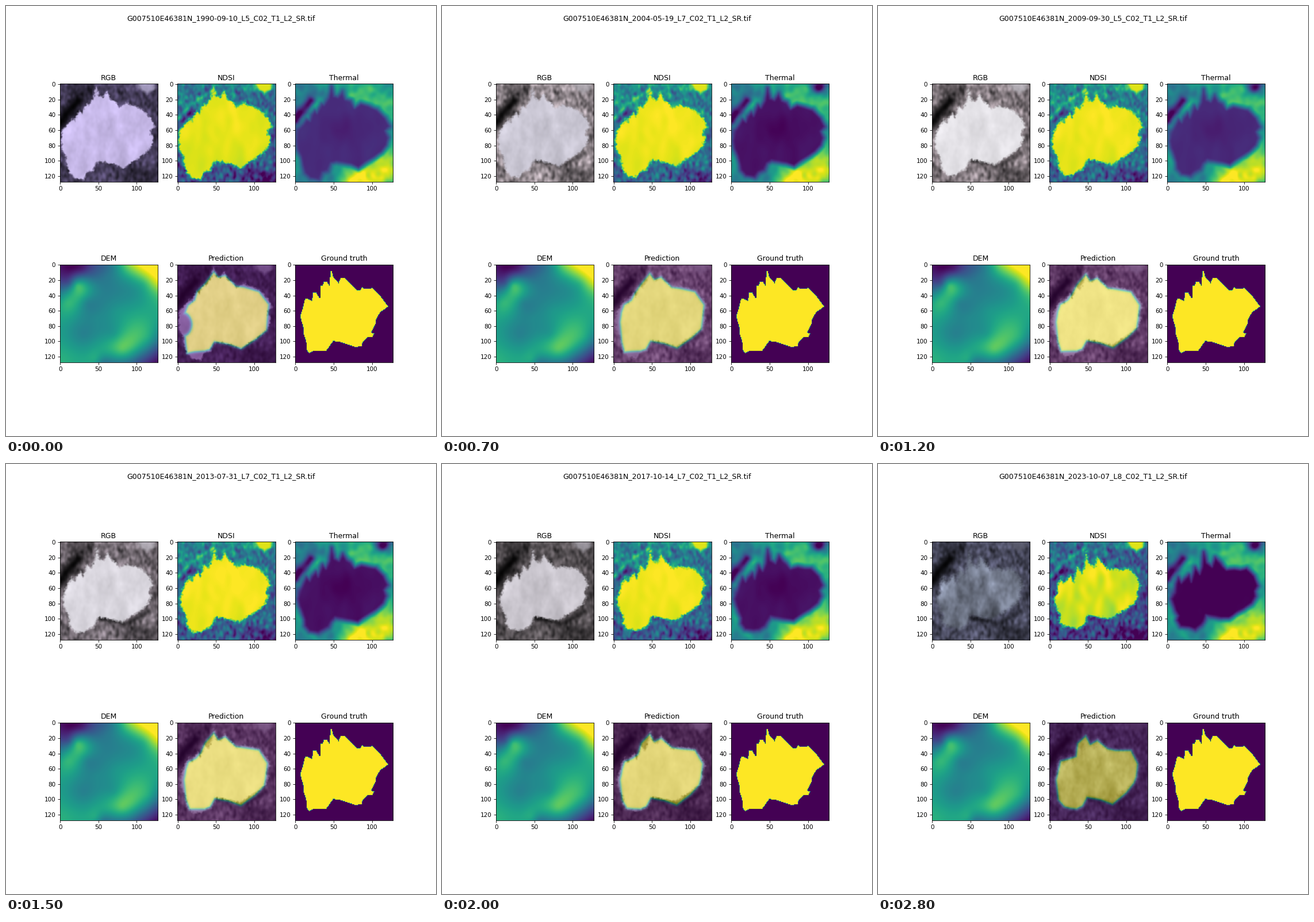
Animation of 748 by 748 pixels, one loop 2.9 s. Source, as a matplotlib script:

```python
import numpy as np
import matplotlib.pyplot as plt
from matplotlib.animation import FuncAnimation
from matplotlib.path import Path

N = 128
rng = np.random.default_rng(7)
Y, X = np.mgrid[0:N, 0:N].astype(float)
GRID = np.column_stack([X.ravel(), Y.ravel()])

SCENES = """1990-09-10_L5 1994-08-20_L5 1995-09-08_L5 1997-08-28_L5 1999-09-11_L7
2000-08-21_L7 2003-08-06_L5 2004-05-19_L7 2004-09-08_L5 2005-08-26_L5
2006-07-28_L7 2008-09-03_L7 2009-09-30_L5 2011-09-20_L5 2012-08-20_L7
2013-07-31_L7 2014-09-05_L8 2015-08-30_L8 2016-09-10_L8 2017-08-19_L8
2017-10-14_L7 2018-09-24_L8 2019-09-03_L8 2021-09-08_L8 2022-07-16_L8
2022-08-25_L8 2022-09-18_L8 2023-08-20_L8 2023-10-07_L8""".split()

# Values of each quantity at the key scenes, interpolated in between
KEYS = [0, 7, 12, 15, 20, 24, 28]
MELT = [0, .25, .4, .5, .7, .95, 1]
ICE = [(200, 186, 234), (203, 200, 213), (229, 227, 232), (219, 216, 224),
       (203, 199, 207), (160, 160, 170), (112, 119, 136)]
ROCK = [(68, 60, 88), (139, 130, 135), (126, 117, 122), (110, 102, 109),
        (82, 77, 80), (79, 77, 86), (70, 71, 90)]
SNOW = [(205, 196, 236), (186, 182, 190), (203, 200, 208), (206, 202, 212),
        (184, 180, 190), (145, 145, 156), (98, 99, 116)]
PATCHY = [.035, .03, .02, .025, .03, .06, .13]
SHADE = [.15, .45, .45, .55, .55, .55, .45]
EDGE = [3.5, 4.5, 4.5, 4.5, 4.5, 5.5, 8]
NDSI_ROCK = [.34, .42, .41, .38, .38, .36, .28]
NDSI_ICE = [.95, .965, .965, .975, .97, .945, .925]
COLD = [.125, .05, .12, .045, .045, .015, 0]
SPOT = [0, 1, .9, 1, 1, 1, 1]

ICE_OLD = np.array([
    (1, 74), (3, 59), (10, 52), (14, 46), (19, 48), (21, 40), (25, 35), (28, 38),
    (34, 26), (37, 27), (43, 18), (47, 3), (50, 16), (55, 17), (61, 10), (65, 20),
    (72, 22), (77, 31), (85, 25), (95, 28), (106, 33), (117, 44), (123, 55),
    (117, 61), (121, 70), (119, 80), (112, 89), (101, 97), (91, 103), (82, 110),
    (72, 105), (53, 101), (46, 103), (42, 113), (35, 115), (31, 125), (19, 123),
    (12, 116), (9, 106), (7, 95), (2, 85)], float)
ICE_NEW = np.array([
    (5, 74), (10, 66), (11, 55), (14, 46), (18, 53), (22, 49), (28, 43), (31, 52),
    (36, 33), (42, 42), (45, 32), (47, 13), (51, 27), (58, 32), (62, 20), (69, 27),
    (72, 31), (77, 36), (87, 35), (95, 36), (103, 34), (113, 44), (118, 57),
    (114, 64), (115, 71), (110, 80), (99, 88), (91, 92), (84, 97), (80, 99),
    (70, 99), (50, 95), (47, 104), (44, 108), (36, 114), (28, 111), (17, 110),
    (12, 102), (14, 96), (10, 89), (8, 82)], float)
PRED_OLD = np.array([
    (8, 75), (9, 64), (13, 53), (22, 46), (25, 35), (35, 25), (47, 9), (53, 16),
    (62, 14), (76, 28), (86, 29), (106, 35), (119, 52), (117, 71), (116, 86),
    (103, 97), (83, 110), (65, 104), (48, 101), (42, 111), (35, 113), (22, 114),
    (12, 116), (10, 101)], float)
PRED_NEW = np.array([
    (8, 75), (12, 58), (14, 50), (25, 47), (34, 44), (36, 27), (47, 17), (53, 28),
    (62, 23), (76, 34), (86, 36), (106, 36), (115, 54), (113, 71), (110, 79),
    (100, 92), (82, 107), (66, 101), (49, 98), (43, 109), (35, 113), (26, 112),
    (19, 110), (11, 101)], float)
TRUTH = [
    (46, 8), (47.5, 8), (48.4, 15), (53, 21), (56, 24), (59.5, 17), (63.5, 17),
    (72, 25.5), (80.7, 33.8), (84.5, 33), (87, 29.5), (89.7, 32), (100, 30.8),
    (110, 40.5), (120.6, 54.8), (110, 62.3), (105, 71), (104, 77), (98.7, 88.6),
    (102.5, 90), (100, 94.6), (93, 95), (87.5, 101), (86, 106.6), (77.7, 107.4),
    (65, 103), (57.4, 100.6), (49, 99.8), (42.4, 109), (40, 112), (27.4, 112.6),
    (22, 113), (17.6, 115.6), (14.6, 111), (14, 101), (11, 91.6), (10, 81),
    (7.1, 71), (6.4, 66), (8.6, 60), (11, 51), (12.4, 44.3), (15, 44),
    (21.4, 47.5), (23, 37), (26.7, 36), (31, 43.5), (32.7, 43.5), (32.7, 27),
    (35.7, 27), (37, 22.5), (41, 22.5), (44.5, 28), (45.2, 12)]

DEM_POINTS = [
    (0, 0, .04), (13, 8, .04), (0, 22, .2), (12, 25, .3), (0, 45, .54),
    (22, 27, .66), (9, 50, .66), (0, 62, .6), (28, 8, .12), (42, 0, .2),
    (42, 16, .34), (60, 14, .39), (64, 0, .38), (76, 4, .55), (87, 3, .76),
    (105, 2, 1), (117, 12, .98), (123, 25, .88), (127, 42, .7), (108, 26, .63),
    (90, 20, .56), (60, 36, .43), (35, 50, .45), (30, 92, .44), (48, 70, .47),
    (8, 82, .53), (4, 106, .58), (5, 124, .63), (35, 115, .57), (45, 123, .6),
    (62, 112, .61), (80, 110, .74), (94, 105, .71), (114, 95, .61), (127, 90, .48),
    (126, 112, .22), (122, 126, .08), (103, 120, .36), (84, 127, .4), (56, 127, .4),
    (72, 60, .52), (100, 60, .58), (120, 62, .6), (70, 90, .54)]
HEAT_POINTS = [
    (0, 0, .45), (18, 4, .45), (10, 18, .4), (32, 16, .5), (50, 0, .55),
    (66, 9, .56), (82, 16, .72), (96, 4, .62), (112, 4, .6), (104, 22, .7),
    (122, 20, .7), (127, 4, .48), (127, 42, .62), (127, 62, .54), (125, 80, .64),
    (118, 97, .85), (100, 108, .86), (85, 116, .95), (74, 122, .96), (62, 127, .78),
    (104, 124, .95), (120, 116, .92), (127, 127, .66), (68, 110, .68), (52, 112, .5),
    (50, 127, .5), (38, 121, .42), (24, 122, .52), (10, 116, .5), (0, 127, .4),
    (0, 104, .55), (0, 82, .5), (0, 66, .4), (20, 34, .5), (60, 60, .5)]


def at(i, values):
    cols = np.array(values, float).reshape(len(KEYS), -1).T
    out = np.array([np.interp(i, KEYS, c) for c in cols])
    return out if len(out) > 1 else out[0]


def noise(sx, sy):
    f = np.fft.fftfreq(N)
    kernel = np.exp(-2 * np.pi**2 * ((sx * f[None])**2 + (sy * f[:, None])**2))
    out = np.fft.ifft2(np.fft.fft2(rng.normal(size=(N, N))) * kernel).real
    return out / out.std()


def smooth(t):
    t = np.clip(t, 0, 1)
    return t * t * (3 - 2 * t)


def line_dist(points, closed=False):
    p = np.array(points, float)
    a, b = (p, np.roll(p, -1, 0)) if closed else (p[:-1], p[1:])
    best = np.full(N * N, 1e9)
    for s, e in zip(a, b):
        v = e - s
        t = np.clip((GRID - s) @ v / (v @ v), 0, 1)
        best = np.minimum(best, np.hypot(*(GRID - s - t[:, None] * v).T))
    return best.reshape(N, N)


def inside(points):
    return Path(points).contains_points(GRID).reshape(N, N)


def depth(points):
    """Signed distance to the outline, positive inside."""
    return np.where(inside(points), 1, -1) * line_dist(points, True)


def streak(points, width):
    return np.exp(-(line_dist(points) / width)**2 / 2)


def blob(x, y, rx, ry):
    return np.exp(-((X - x) / rx)**2 / 2 - ((Y - y) / ry)**2 / 2)


def surface(points):
    """Thin-plate spline through (x, y, value) points."""
    p = np.array(points, float)
    xy, n = p[:, :2] / N, len(p)

    def basis(q):
        r2 = ((q[:, None] - xy[None])**2).sum(2)
        return r2 * np.log(r2 + 1e-12)

    def plane(q):
        return np.column_stack([np.ones(len(q)), q])

    m = np.zeros((n + 3, n + 3))
    m[:n, :n] = basis(xy)
    m[:n, n:] = plane(xy)
    m[n:, :n] = plane(xy).T
    w = np.linalg.solve(m, np.r_[p[:, 2], 0, 0, 0])
    q = GRID / N
    return np.clip(basis(q) @ w[:n] + plane(q) @ w[n:], 0, 1).reshape(N, N)


fine, grain = noise(.8, .8), noise(1.3, 2)
rough, broad, folds = noise(3, 3), noise(8, 8), noise(4, 7)

cliff = streak([(0, 50), (12, 34), (24, 22)], 4.5)
gully = streak([(0, 50), (14, 33), (26, 14), (34, 6)], 8)
ledge = streak([(0, 46), (13, 32), (30, 18), (46, 8)], 2)
rift = streak([(8, 46), (16, 36), (24, 27)], 3)
rim = streak([(50, 99), (70, 102), (84, 107), (101, 99), (114, 91)], 2.6)
patch = smooth(depth([(97, -4), (124, -4), (122, 8), (113, 14), (106, 9)]) / 5 + .5
               + .15 * rough)
corner = smooth((X - 62) / 30) * smooth((Y - 102) / 12)
valley = blob(44, 66, 7, 20) + .6 * blob(75, 94, 22, 6)
glow = blob(91, 58, 16, 12) + blob(16, 62, 8, 11) + .6 * blob(36, 97, 8, 7)

dem = surface(DEM_POINTS)
heat = surface(HEAT_POINTS) + .035 * rough
heat = heat - .42 * streak([(0, 46), (10, 34), (20, 22)], 4.5)
heat = heat + .12 * streak([(6, 55), (17, 40), (27, 27)], 3)
truth = inside(TRUTH).astype(float)


def outline(old, new, k):
    return old + (new - old) * k


def true_colour(i, d):
    k = at(i, MELT)
    tone = 1 + .17 * grain + .08 * rough + .06 * broad
    tone = tone * (1 - .85 * cliff) * (1 - .35 * gully) * (1 - .28 * corner)
    land = at(i, ROCK) * tone[..., None]
    land += (at(i, SNOW) - land) * (.85 * patch * (.8 + .2 * smooth(.5 + rough)))[..., None]
    land *= (1 - at(i, SHADE) * rim)[..., None]
    late = smooth((k - .6) / .4)
    gloss = 1 + at(i, PATCHY) * (folds + .35 * grain)
    gloss = gloss + late * (.14 * glow - .2 * valley)
    gloss = gloss * (1 - .05 * blob(55, 55, 9, 22))
    ice = at(i, ICE) * gloss[..., None]
    m = smooth((d + .6 * fine) / at(i, EDGE) + .5)[..., None]
    return np.clip((land + (ice - land) * m) / 255, 0, 1)


def snow_index(i, d):
    k = at(i, MELT)
    land = at(i, NDSI_ROCK) + .1 * (60 - Y) / 64 + .075 * grain + .045 * rough
    land = land - .09 * corner + .22 * ledge - .25 * rift
    land = land - .15 * blob(122, 124, 9, 6)
    land = land + (.95 - land) * patch
    ice = at(i, NDSI_ICE) + (.012 + .025 * smooth((k - .7) / .3)) * folds
    ice = ice + .03 * blob(80, 55, 18, 18)
    return land + (ice - land) * smooth((d + .7 * fine) / 5 + .55)


def thermal(i, d):
    land = np.clip(heat - at(i, SPOT) * .6 * blob(113, 4, 7, 6), 0, 1)
    cold = at(i, COLD) + .006 * folds - .04 * blob(60, 58, 18, 14)
    return cold + (land - cold) * smooth((3.5 - d) / 11)


def prediction(i):
    d = depth(outline(PRED_OLD, PRED_NEW, at(i, MELT)))
    bite = np.hypot((X - 4) / 14, (Y - 78) / 16) - 1
    d = np.minimum(d, bite * 12 + 8 * i)
    return 1 / (1 + np.exp(-d / .9))


fig, axes = plt.subplots(2, 3, figsize=(10, 10), dpi=74.8)
title = fig.suptitle("")
ax_rgb, ax_ndsi, ax_heat, ax_dem, ax_pred, ax_truth = axes.flat
names = ["RGB", "NDSI", "Thermal", "DEM", "Prediction", "Ground truth"]
for ax, name in zip(axes.flat, names):
    ax.set_title(name)

blank = np.zeros((N, N))
scale = dict(vmin=0, vmax=1, cmap="viridis")
im_rgb = ax_rgb.imshow(np.zeros((N, N, 3)))
im_ndsi = ax_ndsi.imshow(blank, **scale)
im_heat = ax_heat.imshow(blank, **scale)
ax_dem.imshow(dem, **scale)
im_base = ax_pred.imshow(np.zeros((N, N, 3)))
im_mask = ax_pred.imshow(blank, alpha=.5, **scale)
ax_truth.imshow(truth, **scale)


def update(i):
    d = depth(outline(ICE_OLD, ICE_NEW, at(i, MELT)))
    rgb = true_colour(i, d)
    im_rgb.set_data(rgb)
    im_base.set_data(rgb)
    im_ndsi.set_data(np.clip(snow_index(i, d), 0, 1))
    im_heat.set_data(np.clip(thermal(i, d), 0, 1))
    im_mask.set_data(prediction(i))
    title.set_text(f"G007510E46381N_{SCENES[i]}_C02_T1_L2_SR.tif")
    return im_rgb, im_base, im_ndsi, im_heat, im_mask, title


anim = FuncAnimation(fig, update, frames=len(SCENES), interval=100,
                     repeat=True, repeat_delay=0, blit=False)
plt.show()
```
